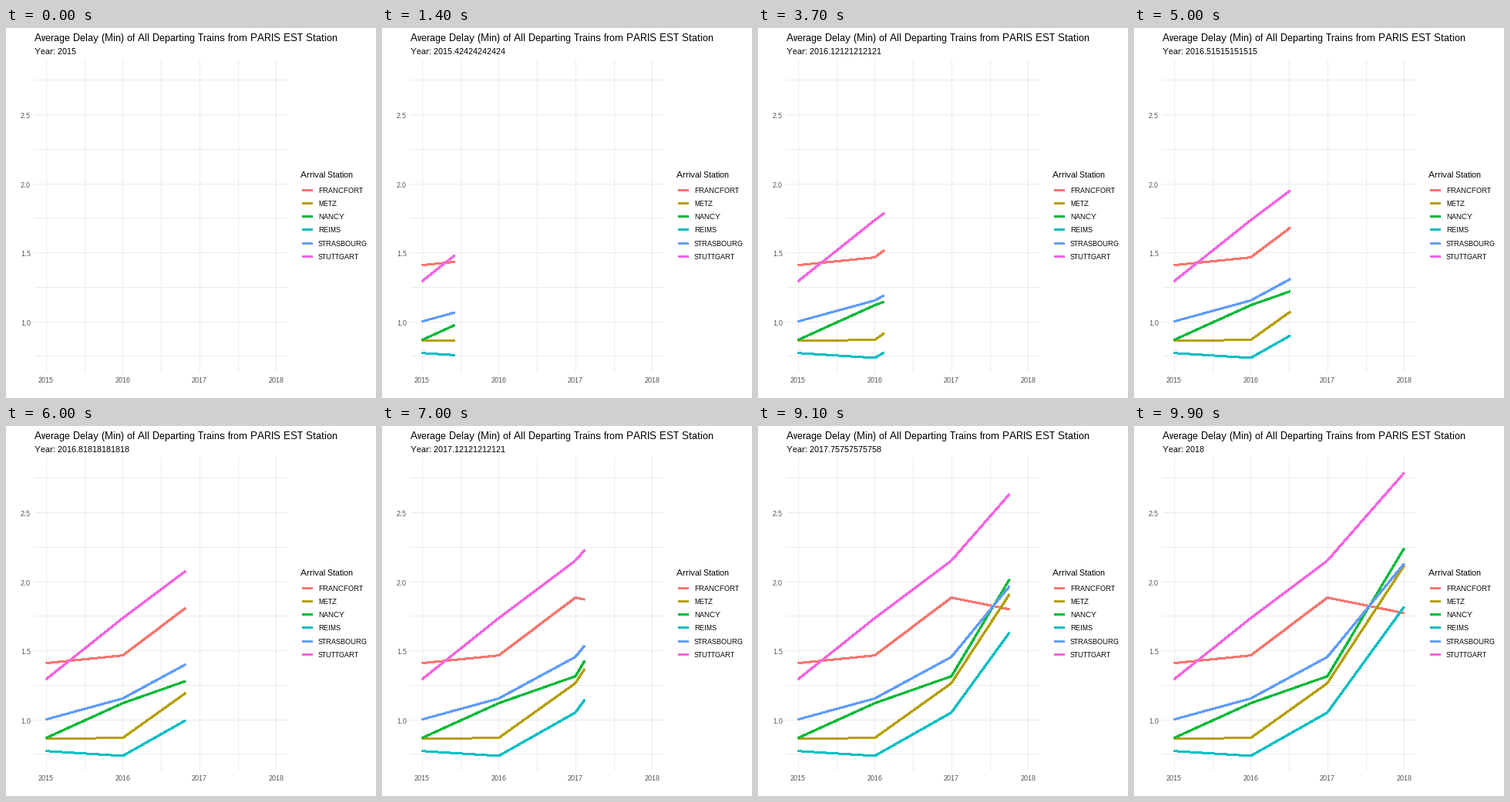
A matplotlib script that plays this animation: 480 by 480 pixels, repeating every 10000 ms.

```python
import matplotlib.pyplot as plt
import numpy as np
from matplotlib.animation import FuncAnimation

FRAMES = 100
PX = 72 / 96  # points per pixel
GRID, GREY = "#EBEBEB", "#4D4D4D"
YEARS = np.arange(2015, 2019)

# station: colour, mean delay for each year
SERIES = {
    "FRANCFORT": ("#F8766D", [1.413, 1.469, 1.888, 1.776]),
    "METZ": ("#B79F00", [0.866, 0.871, 1.268, 2.118]),
    "NANCY": ("#00BA38", [0.871, 1.123, 1.318, 2.244]),
    "REIMS": ("#00BFC4", [0.776, 0.741, 1.055, 1.820]),
    "STRASBOURG": ("#619CFF", [1.005, 1.157, 1.458, 2.133]),
    "STUTTGART": ("#F564E3", [1.296, 1.739, 2.156, 2.791]),
}

plt.rcParams.update({
    "font.family": "Liberation Sans",
    "text.antialiased": True,
    "text.hinting": "native",
    "text.hinting_factor": 1,
})

fig = plt.figure(figsize=(5, 5), dpi=96, facecolor="white")
ax = fig.add_axes([0, 0, 1, 1])
ax.set(xlim=(0, 480), ylim=(480, 0))
ax.axis("off")


def to_x(year):
    return 52 + 99.42 * (np.asarray(year) - 2015)


def to_y(delay):
    return 381.1 - 179 * (np.asarray(delay) - 1)


def line(xs, ys, color, width):
    return ax.plot(xs, ys, color=color, lw=width * PX, antialiased=False,
                   solid_capstyle="butt", solid_joinstyle="round")[0]


def label(x, y, text, size, color="black", ha="left"):
    return ax.text(x, y, text, fontsize=size * PX, color=color,
                   ha=ha, va="baseline")


# straight lines snap to the centre of the pixel row or column they start in
for year in np.arange(2015, 2018.1, 0.5):
    x = np.round(to_x(year))
    line([x, x], [41, 446], GRID, 1)
for delay in np.arange(0.75, 2.8, 0.25):
    y = np.floor(to_y(delay))
    line([37, 365], [y, y], GRID, 1)

for year in YEARS:
    label(to_x(year), 460, str(year), 9, GREY, "center")
for delay in (1.0, 1.5, 2.0, 2.5):
    label(32, np.floor(to_y(delay)) + 5, f"{delay:.1f}", 9, GREY, "right")

label(37, 17, "Average Delay (Min) of All Departing Trains "
              "from PARIS EST Station", 13)
subtitle = label(37, 34, "", 11)

label(382, 194, "Arrival Station", 11)
for i, (name, (color, _)) in enumerate(SERIES.items()):
    y = np.floor(210 + 17.28 * i)
    line([384, 397], [y, y], color, 3)
    label(405, y + 4, name, 9)

# unsmoothed slanted strokes fill every pixel they touch, so 2 covers about 3
curves = [line([], [], color, 2) for color, _ in SERIES.values()]


def update(frame):
    now = 2015 + 3 * frame / (FRAMES - 1)
    subtitle.set_text(f"Year: {now:.15g}")
    years = np.append(YEARS[YEARS < now], now)
    for curve, (_, delays) in zip(curves, SERIES.values()):
        curve.set_data(to_x(years),
                       to_y(np.interp(years, YEARS, delays)) + 0.5)
        curve.set_visible(frame > 0)
    return [subtitle, *curves]


anim = FuncAnimation(fig, update, frames=FRAMES, interval=100,
                     repeat=True, repeat_delay=0, blit=False)
plt.show()
```
